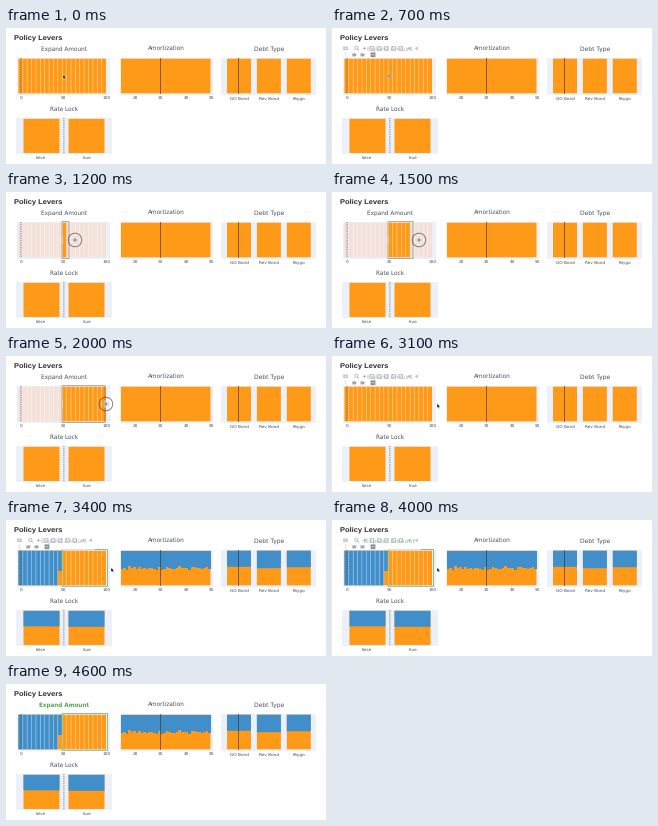
These frames come from a looping animation (320x136 px, 4.8 s). A matplotlib script:

```python
import numpy as np
import matplotlib.pyplot as plt
from matplotlib.animation import FuncAnimation
from matplotlib.patches import Circle, Polygon, Rectangle

W, H, DPI = 320, 136, 100
FRAMES, INTERVAL = 48, 100
PT = 72 / DPI

ORANGE, BLUE, PALE = "#ff9a18", "#408fcb", "#f3e1da"
PANEL, INK, GREEN, ICON = "#ebf0f9", "#484f5c", "#58a558", "#a4a9b0"

# Frame numbers at which the state switches
PICK_TOOL, DRAG_START, RELEASE, APPLY, CONFIRM, LEAVE = 7, 10, 25, 34, 36, 40

BIN_EDGES = np.linspace(12.4, 100, 21)
HALF = 10
TERM_EDGES = np.linspace(115, 204.5, 37)
TERM_SPLITS = 47.8 + np.random.default_rng(4).uniform(-1.9, 1.9, 36)

plt.rcParams.update({"text.hinting": "none", "font.family": "DejaVu Sans"})
fig = plt.figure(figsize=(W / DPI, H / DPI), dpi=DPI, facecolor="white")
ax = fig.add_axes([0, 0, 1, 1])


def linear(n, start, end):
    return np.clip((n - start) / (end - start), 0, 1)


def ease(n, start, end):
    t = linear(n, start, end)
    return t * t * (3 - 2 * t)


def rect(x0, y0, x1, y1, color, **kw):
    kw = {"lw": 0, "snap": False, **kw}
    ax.add_patch(Rectangle((x0, y0), x1 - x0, y1 - y0, fc=color, **kw))


def outline(x0, y0, x1, y1, color, width=0.7, **kw):
    rect(x0, y0, x1, y1, "none", ec=color, lw=width * PT, **kw)


def line(xs, ys, color, width=0.7, **kw):
    kw = {"solid_capstyle": "butt", "snap": False, **kw}
    ax.plot(xs, ys, color=color, lw=width * PT, **kw)


def label(x, y, text, size=5.8, color=INK, **kw):
    kw = {"ha": "center", "va": "baseline", **kw}
    ax.text(x, y, text, fontsize=size * PT, color=color, **kw)


def ticks(x, y, pitch, texts):
    for i, text in enumerate(texts):
        label(x + i * pitch, y, text, 4.3)


def marker(x, y0, y1, dotted=False):
    style = (0, (1.4, 1.4)) if dotted else "-"
    line([x, x], [y0, y1], "#33302c", 0.8, ls=style, alpha=0.75)


def category_bars(x, pitch, width, top, bottom, splits, applied):
    for i, split in enumerate(splits):
        x0 = x + i * pitch
        rect(x0, top, x0 + width, bottom, ORANGE)
        if applied:
            rect(x0, top, x0 + width, split, BLUE)


def drag_x(n):
    return 57 + 42 * linear(n, DRAG_START, 17) + 6 * ease(n, 19, 23)


def amount_panel(n):
    rect(11, 30, 104, 67, PANEL)
    dragging = DRAG_START <= n < RELEASE
    applied = n >= APPLY
    brush_edge = drag_x(n - 1)
    rect(BIN_EDGES[0], 30.7, BIN_EDGES[-1], 65.3, PALE if dragging else ORANGE)
    if dragging:
        covered = BIN_EDGES[:-1] + 0.7 * np.diff(BIN_EDGES) < brush_edge
        last = max(covered.sum(), HALF)
        rect(BIN_EDGES[HALF], 30.7, BIN_EDGES[last], 65.3, ORANGE)
    if applied:
        rect(BIN_EDGES[0], 30.7, BIN_EDGES[HALF - 1], 65.3, BLUE)
        rect(BIN_EDGES[HALF - 1], 30.7, BIN_EDGES[HALF], 51, BLUE)
    for x in BIN_EDGES[1:-1]:
        line([x, x], [30.7, 65.3], "white", 0.6, alpha=0.6)
    marker(15, 30, 66, dotted=True)
    if dragging:
        outline(56, 29.5, brush_edge, 66.5, "#77706a", 0.7, alpha=0.8)
        for x in (56, brush_edge):
            rect(x - 0.7, 44, x + 0.7, 52, "#f4f4f4", ec="#999999", lw=0.3)
    if applied:
        outline(56.2, 29.5, 101.5, 66.3, "#6fb36f", 0.9, alpha=0.9)
    if n >= CONFIRM:
        label(57.6, 22.4, "Expand Amount", 5.7, GREEN, weight="bold")
    else:
        label(57.8, 22.4, "Expand Amount")
    ticks(15, 72.2, 42.7, ("0", "50", "100"))


def term_panel(applied):
    rect(114, 30, 207, 67, PANEL)
    rect(TERM_EDGES[0], 30.7, TERM_EDGES[-1], 65.3, ORANGE)
    if applied:
        ax.stairs(TERM_SPLITS, TERM_EDGES, baseline=30.7, fill=True,
                  color=BLUE, lw=0, zorder=1)
    marker(154.5, 30, 66)
    label(160.3, 22.4, "Amortization")
    ticks(129.2, 72.2, 25.4, ("20", "30", "40", "50"))


def debt_panel(applied):
    rect(215, 30, 310, 67, PANEL)
    category_bars(221, 29.9, 24, 30.7, 65.3, (46.8, 48.2, 47.2), applied)
    marker(232.5, 30, 66)
    label(262.7, 22.4, "Debt Type", 6)
    ticks(233, 72, 29.9, ("GO Bond", "Rev Bond", "Paygo"))


def rate_panel(applied):
    rect(10, 90, 106, 126, PANEL)
    category_bars(17.5, 45, 36, 90.8, 125, (106.4, 106.8), applied)
    marker(57.9, 90, 126, dotted=True)
    label(58, 83.2, "Rate Lock")
    ticks(35, 130.8, 46, ("false", "true"))


def toolbar(alpha, select_on):
    if alpha <= 0:
        return
    rect(10, 17, 89, 30, "white", alpha=0.6 * alpha, zorder=5)
    soft = {"alpha": 0.7 * alpha, "zorder": 6}
    rect(11.2, 18.6, 15.8, 22, ICON, **soft)
    ax.add_patch(Circle((13.5, 20.4), 0.9, fc="white", lw=0, **soft))
    ax.add_patch(Circle((24.3, 19.8), 1.6, fc="none", ec=ICON, lw=0.7, **soft))
    line([25.4, 27], [21, 22.6], ICON, 1, **soft)
    line([30.5, 34.5], [20.4, 20.4], ICON, 1, **soft)
    line([32.5, 32.5], [18.4, 22.4], ICON, 1, **soft)
    for x in np.arange(40, 75, 7.2):
        outline(x - 1.8, 18.6, x + 1.8, 22.2, ICON, 1, **soft)
    for x in (77, 84.5):
        arrow = [(x - 2, 20.4), (x + 1.5, 18.6), (x + 1.5, 22.2)]
        ax.add_patch(Polygon(arrow, fc=ICON, lw=0, **soft))
    line([13.5, 13.5], [24.8, 28.8], ICON, 1, ls=":", **soft)
    for x in (22.3, 30.5):
        rect(x - 2, 25.4, x + 2, 28.4, "#7b8189", **soft)
    rect(38.6, 24.4, 43.4, 29.2, "#59606c" if select_on else ICON, **soft)
    line([39.8, 42.2], [26.8, 26.8], "white", 0.8, **soft)


def pointer(n):
    to_tool = ease(n, 0, 4) - linear(n, 5, PICK_TOOL)
    leaving = ease(n, LEAVE, LEAVE + 5)
    x = drag_x(n) - 16 * to_tool + 21 * leaving
    y = 48 - 21 * to_tool + ease(n, RELEASE, 28) + 92 * leaving
    top = {"zorder": 7}
    if DRAG_START <= n < RELEASE:
        ax.add_patch(Circle((x, y), 6.8, fc="none", ec="#4a4644", lw=0.8 * PT,
                            alpha=0.8, **top))
    if PICK_TOOL <= n < RELEASE:
        for color, width in (("white", 1.3), ("#555555", 0.7)):
            line([x - 2.2, x + 2.2], [y, y], color, width, **top)
            line([x, x], [y - 2.2, y + 2.2], color, width, **top)
    else:
        shape = np.array([(0, 0), (0, 4.4), (1.1, 3.5), (1.9, 5), (2.7, 4.6),
                          (2, 3.2), (3.2, 3.1)])
        ax.add_patch(Polygon(shape + (x, y - 1.5), fc="black", ec="white",
                             lw=0.3, **top))


def draw(n):
    ax.clear()
    ax.set(xlim=(0, W), ylim=(H, 0))
    ax.axis("off")
    applied = n >= APPLY
    label(8, 11.4, "Policy Levers", 7.5, "#2a2a2a", ha="left",
          family="Liberation Sans", weight="bold")
    amount_panel(n)
    term_panel(applied)
    debt_panel(applied)
    rate_panel(applied)
    bar_alpha = (ease(n, 0, 3) - ease(n, 9, 11)
                 + ease(n, RELEASE - 1, 27) - ease(n, LEAVE, 46))
    toolbar(bar_alpha, n >= PICK_TOOL)
    pointer(n)
    return []


animation = FuncAnimation(fig, draw, frames=FRAMES, interval=INTERVAL,
                          init_func=lambda: [], repeat=True, repeat_delay=0)
plt.show()
```
